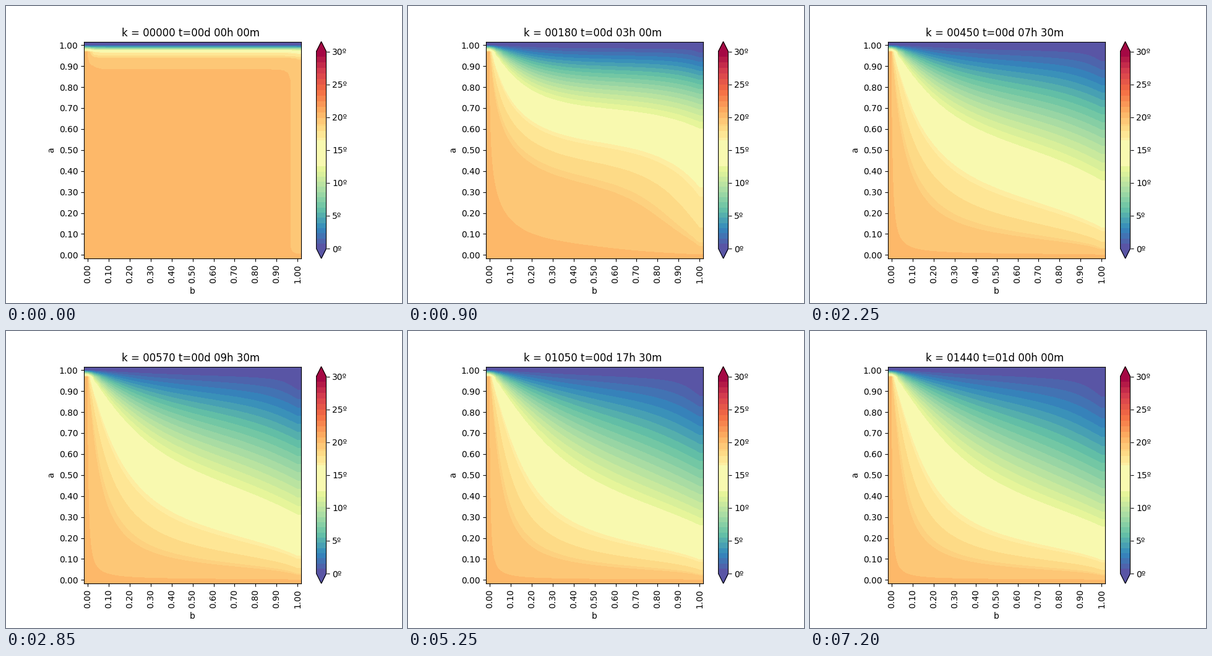
Animation of 640 by 480 pixels, one loop 7350 ms. Source, as a matplotlib script:

```python
import numpy as np
import matplotlib.pyplot as plt
from matplotlib.animation import FuncAnimation
from matplotlib.colors import ListedColormap

N = 31              # nodes per side
R = 0.288           # diffusion number of a one-minute step
FLUX = 10.0         # heat leaving through the right side
WARM, COLD, T_MAX = 20, 0, 30
FRAMES, STRIDE = 49, 30


def banded_cmap(bins=1500):
    """Spectral colours averaged inside each temperature band."""
    edges = np.r_[np.linspace(0, 12.5, 17),
                  16.5, 16.85, 17.95, 18.7, 18.95,
                  np.linspace(19.92, T_MAX, 13)]
    temps = (np.arange(bins) + 0.5) * T_MAX / bins
    colors = plt.get_cmap("Spectral_r")(temps / T_MAX)
    band = np.digitize(temps, edges)
    for b in np.unique(band):
        colors[band == b] = colors[band == b].mean(axis=0)
    return ListedColormap(colors)


def step_matrix():
    """Inverse of the implicit heat step; side rows hold the boundary rules."""
    node = np.arange(N * N).reshape(N, N)
    m = np.eye(N * N)
    inner = node[1:-1, 1:-1].ravel()
    m[inner, inner] += 4 * R
    for shift in (1, -1, N, -N):
        m[inner, inner + shift] = -R
    right = node[1:-1, -1]
    m[right, right - 1] = -1
    return np.linalg.inv(m)


def simulate():
    inverse = step_matrix()
    t = np.full((N, N), float(WARM))
    states = []
    for k in range((FRAMES - 1) * STRIDE + 1):
        t[:, -1] = -FLUX / (N - 1)
        t[:, 0] = t[0] = WARM
        t[-1] = COLD
        t = (inverse @ t.ravel()).reshape(N, N)
        if k % STRIDE == 0:
            states.append(t.copy())
    return states


def title(k):
    return f"k = {k:05d} t={k // 1440:02d}d {k // 60 % 24:02d}h {k % 60:02d}m "


states = simulate()

fig, ax = plt.subplots(figsize=(6.4, 4.8), dpi=100)
fig.subplots_adjust(bottom=0.15)
img = ax.imshow(states[0], cmap=banded_cmap(), vmin=0, vmax=T_MAX,
                origin="lower", interpolation="bilinear")
ticks = np.arange(0, N, 3)
labels = [f"{v / (N - 1):.2f}" for v in ticks]
ax.set_xticks(ticks, labels, rotation=90)
ax.set_yticks(ticks, labels)
ax.set_xlabel("b")
ax.set_ylabel("a")
heading = ax.set_title(title(0))
fig.colorbar(img, ax=ax, extend="both", aspect=22,
             ticks=range(0, T_MAX + 1, 5), format="%dº")


def update(i):
    img.set_data(states[i])
    heading.set_text(title(i * STRIDE))
    return img, heading


anim = FuncAnimation(fig, update, frames=FRAMES, interval=150,
                     repeat=True, repeat_delay=0, blit=False)
plt.show()
```
